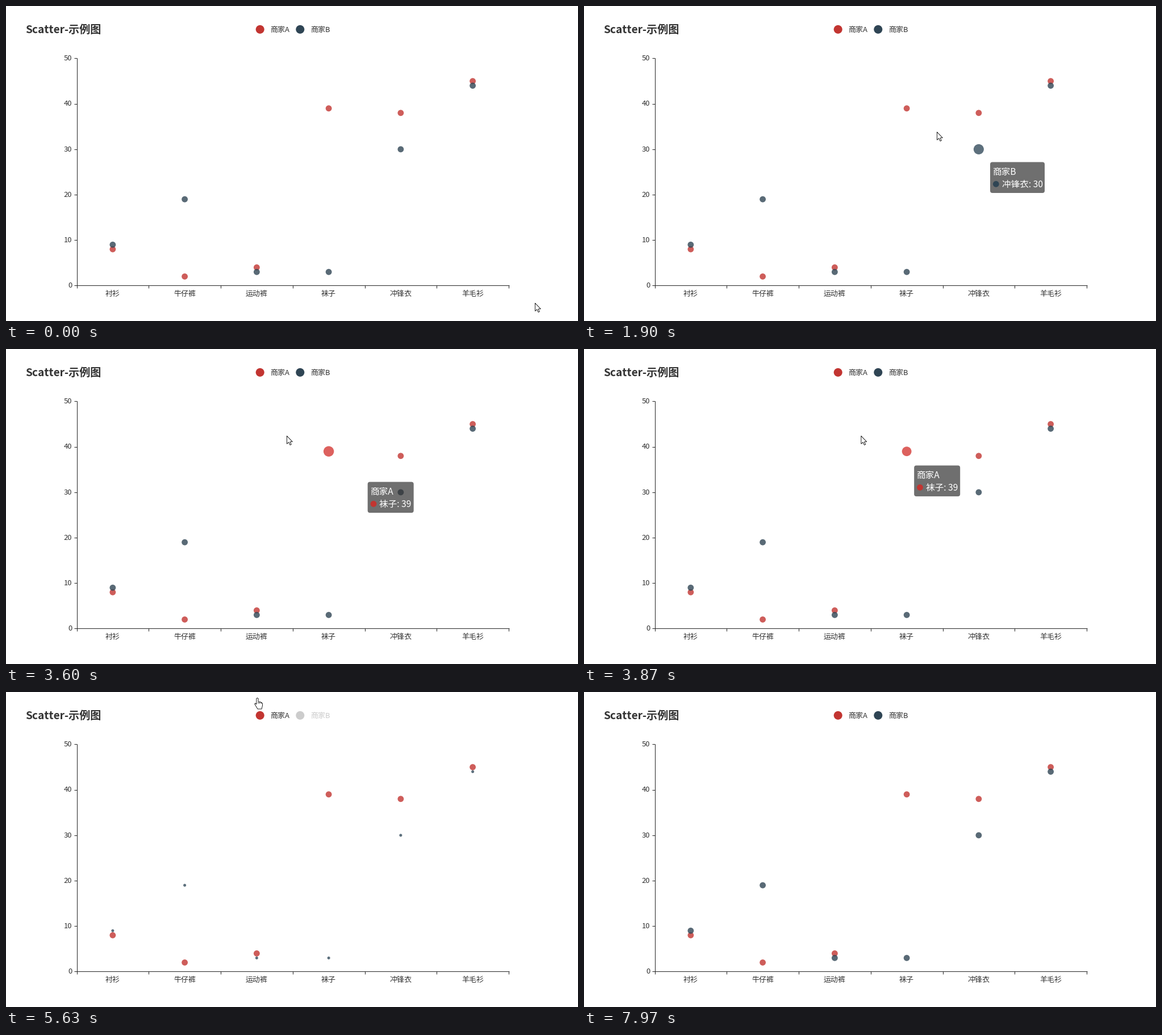
Recreate the animation shown at these times as a matplotlib script. Size 1007 px wide and 556 px high, loop 8 s.

```python
import numpy as np
import matplotlib.pyplot as plt
from matplotlib.animation import FuncAnimation
from matplotlib.colors import to_rgb
from matplotlib.patches import Circle, FancyBboxPatch, PathPatch
from matplotlib.path import Path

W, H = 1007, 556
STEP, FRAMES = 32, 250
RED, NAVY, INK, GREY = "#c23531", "#2f4554", "#333333", "#cccccc"
FONT = "Noto Sans CJK JP"
ITEMS = ["衬衫", "牛仔裤", "运动裤", "袜子", "冲锋衣", "羊毛衫"]
SERIES = {RED: [8, 2, 4, 39, 38, 45], NAVY: [9, 19, 3, 3, 30, 44]}
NAMES = {RED: "商家A", NAVY: "商家B"}
X0, X1, Y0, Y1 = 124.5, 885, 493.5, 92.5
SLOT = (X1 - X0) / len(ITEMS)
R, R_UP = 5.4, 3

# interaction times in ms
TIP_B = (1850, 2430)
TIP_A = (3536, 4700)
HOVER_B, CLICK_OFF, CLICK_ON = 5440, 5485, 6828
HOVER_A = (7655, 7712)
GONE = 7955

# pointer moves: start, end, destination
START = (931, 524)
MOVES = [
    (430, 1136, (721, 199)), (1136, 1230, (683, 212)),
    (1270, 1560, (652, 330)), (1560, 1850, (621, 222)),
    (1910, 2070, (506, 208)), (2400, 3560, (494, 153)),
    (3610, 3870, (487, 153)), (4670, 4880, (410, 153)),
    (5000, 5470, (442, 10)), (7640, 7950, (57, 13)),
]


def make_path(*runs):
    verts, codes = [], []
    for run in runs:
        verts += run
        codes += [Path.MOVETO] + [Path.LINETO] * (len(run) - 1)
    return np.array(verts, float), codes


ARROW = make_path([(0, 0), (0, 14), (3.2, 11), (5.6, 16), (7.8, 15),
                   (5.5, 10.4), (9.8, 10.2), (0, 0)])
HAND = make_path(
    [(-1.6, 11), (-1.6, 1), (0, 0), (1.6, 1), (1.6, 6.8), (4, 6.8), (6.5, 7.6),
     (9, 9.5), (9, 13.5), (7.5, 19.5), (.5, 19.5), (-4.8, 10.6), (-3.6, 9.3),
     (-1.6, 11)],
    *[[(x, 7.5), (x, 10)] for x in (1.6, 4.2, 6.8)])


def elastic(ms, span=400):
    k = ms / span
    if k <= 0:
        return 0.0
    if k >= 1:
        return 1.0
    return 1 + 2 ** (-10 * k) * np.sin((k - .1) * 5 * np.pi)


def hover(t, on, off):
    return elastic(t - on) - elastic(t - off, 250)


def cubic_out(k):
    return 1 - (1 - np.clip(k, 0, 1)) ** 3


def bezier(k):
    """cubic-bezier(0.23, 1, 0.32, 1)"""
    s = np.linspace(0, 1, 101)
    a, b, c = 3 * s * (1 - s) ** 2, 3 * s ** 2 * (1 - s), s ** 3
    return np.interp(k, .23 * a + .32 * b + c, a + b + c)


def lift(color):
    return tuple(min(1, 1.1 * v) for v in to_rgb(color))


def pointer_at(t):
    pos = np.array(START, float)
    for t0, t1, goal in MOVES:
        pos += (goal - pos) * np.clip((t - t0) / (t1 - t0), 0, 1)
    return pos


fig = plt.figure(figsize=((W + .01) / 72, (H + .01) / 72), dpi=72, facecolor="white")
ax = fig.add_axes([0, 0, 1, 1])
ax.set(xlim=(0, W), ylim=(H, 0))
ax.axis("off")


def label(x, mid, s, size=13, ha="left", color=INK, **kw):
    return ax.text(x, mid + .38 * size, s, fontsize=size, family=FONT, ha=ha,
                   va="baseline", color=color, **kw)


def line(xs, ys):
    ax.plot(xs, ys, color=INK, lw=1.1, solid_capstyle="butt")


def disc(x, y, r, color, **kw):
    return ax.add_patch(Circle((x, y), r, fc=color, lw=0, **kw))


def slot_x(i):
    return X0 + (i + .5) * SLOT


def val_y(v):
    return Y0 - v * (Y0 - Y1) / 50


# static chart
label(34, 41, "Scatter-示例图", 19.1, weight="bold")
line([X0, X0], [Y1 - .5, Y0 + .5])
line([X0 - .5, X1 + .5], [Y0, Y0])
for v in range(0, 51, 10):
    line([X0 - 5, X0], [val_y(v)] * 2)
    label(116.4, val_y(v) - 1.2, str(v), ha="right")
for i in range(len(ITEMS) + 1):
    line([X0 + i * SLOT] * 2, [Y0, Y0 + 5])
for i, item in enumerate(ITEMS):
    label(slot_x(i), 507, item, ha="center")

legend = {}
for x, c in ((447.2, RED), (517.8, NAVY)):
    legend[c] = disc(x, 41.3, 7.5, c), label(x + 18, 41, NAMES[c])

dots = {c: [disc(slot_x(i), val_y(v), R, c, alpha=.8, zorder=3)
            for i, v in enumerate(vals)] for c, vals in SERIES.items()}

# tooltip and pointer
tip_box = ax.add_patch(FancyBboxPatch(
    (0, 0), 96, 55, boxstyle="round,pad=0,rounding_size=4",
    fc=to_rgb("#323232") + (.7,), lw=0, zorder=5))
tip_dot = disc(0, 0, 5.4, RED, zorder=6)
tip_head = label(0, 0, "", 15.6, color="white", zorder=6)
tip_body = label(0, 0, "", 15.6, color="white", zorder=6)
tip = [tip_box, tip_dot, tip_head, tip_body]
pointer = ax.add_patch(PathPatch(Path([(0, 0), (1, 1)]), fc="white", ec="black",
                                 lw=.85, zorder=9))


def show_tip(x, y, c, i, width):
    tip_box.set_bounds(x, y, width, 54.5)
    tip_dot.set(center=(x + 10.3, y + 38.8), facecolor=c)
    tip_head.set(position=(x + 5, y + 22.8), text=NAMES[c])
    tip_body.set(position=(x + 20.5, y + 44.6), text=f"{ITEMS[i]}: {SERIES[c][i]}")


def draw_tip(t):
    on_b = TIP_B[0] <= t < TIP_B[1]
    on_a = TIP_A[0] <= t < TIP_A[1]
    for part in tip:
        part.set_visible(on_b or on_a)
    if on_b:
        show_tip(715, 275.5, NAVY, 4, 96)
    elif on_a:
        k = bezier(min((t - TIP_A[0]) / 400, 1))
        show_tip(715 - 134 * k, 275.5 - 70 * k, RED, 3, 81)


def emphasis(t, c, i):
    if c == RED:
        return hover(t, *HOVER_A) + (hover(t, *TIP_A) if i == 3 else 0)
    if t >= CLICK_ON:
        return 0
    return elastic(t - HOVER_B) + (hover(t, *TIP_B) if i == 4 else 0)


def navy_scale(t):
    if t >= CLICK_ON:
        return max(.1, cubic_out((t - CLICK_ON) / 800))
    return 1 - cubic_out((t - CLICK_OFF) / 400)


def draw_dots(t):
    for c, row in dots.items():
        scale = navy_scale(t) if c == NAVY else 1
        for i, dot in enumerate(row):
            up = emphasis(t, c, i)
            dot.set_radius((R + R_UP * up) * scale)
            dot.set_visible(scale > 0)
            dot.set_facecolor(lift(c) if up > .3 else c)


def draw_pointer(t):
    pos = pointer_at(t)
    over_legend = pos[1] < 19 and 366 < pos[0] < 497
    verts, codes = HAND if over_legend else ARROW
    pointer.set_path(Path(verts + pos + .5, codes))
    pointer.set_visible(t < GONE)


def update(n):
    t = (n + .5) * STEP
    off = CLICK_OFF <= t < CLICK_ON
    icon, name = legend[NAVY]
    icon.set_facecolor(GREY if off else NAVY)
    name.set_color(GREY if off else INK)
    draw_dots(t)
    draw_tip(t)
    draw_pointer(t)
    return []


anim = FuncAnimation(fig, update, frames=FRAMES, interval=STEP, repeat=True,
                     repeat_delay=0, blit=False)
plt.show()
```
